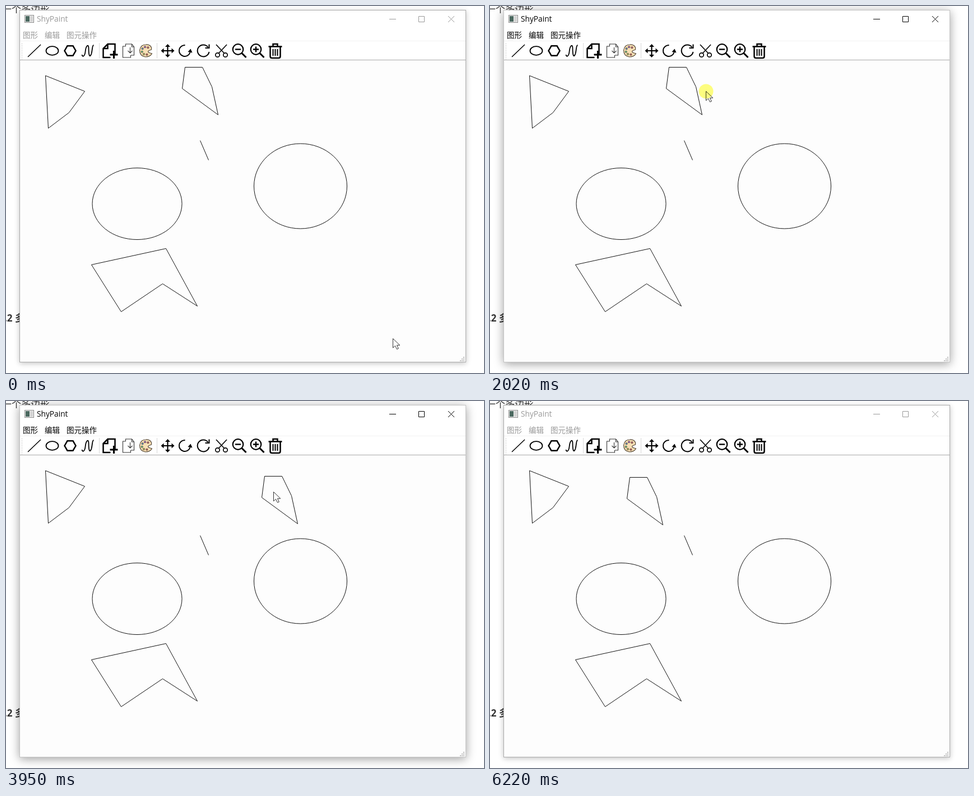
An HTML page with a canvas that plays this animation: 853 by 656 pixels, repeating every 6.43 s.

```html
<!DOCTYPE html>
<html lang="zh">
<head>
<meta charset="utf-8">
<title>Paint window</title>
<style>
html, body { margin: 0; width: 100%; height: 100%; overflow: hidden; background: #fff; }
canvas { display: block; }
</style>
</head>
<body>
<canvas id="stage" width="853" height="656"></canvas>
<script>
const g = document.getElementById('stage').getContext('2d');
const LOOP = 6430, STEP = 77;
const CJK = '"Noto Sans CJK SC", "Noto Sans CJK", sans-serif';

// Cursor moves: start, end, and where it arrives
const moves = [
  [70, 680, 299, 83],
  [760, 900, 296, 82],
  [1310, 1470, 357, 152],
  [1620, 1690, 349, 145],
  [1860, 2260, 420, 158],
  [2400, 2630, 406, 150],
  [2950, 3480, 477, 162],
  [4110, 4590, 292, 163],
  [4660, 4750, 265, 164],
  [5200, 5820, 798, 647]
];
const click = [830, 1080];
const drags = [[1690, 2400], [2870, 3560], [4030, 4900]];

const within = (v, [a, b]) => v >= a && v < b;
const smooth = p => p * p * (3 - 2 * p);

function cursorAt(t) {
  let x = 690, y = 594;
  for (const [a, b, tx, ty] of moves) {
    if (t < a) break;
    const gaps = Math.round((b - a) / STEP);
    const done = t >= b ? 1 : (Math.floor((t - a) / (b - a) * gaps) + 1) / (gaps + 1);
    x += (tx - x) * smooth(done);
    y += (ty - y) * smooth(done);
  }
  return [Math.round(x), Math.round(y)];
}

// A dragged shape jumps on release by the distance the cursor went
function dragOffset(t) {
  let dx = 0, dy = 0;
  for (const [a, b] of drags) {
    if (t < b) break;
    const [x0, y0] = cursorAt(a), [x1, y1] = cursorAt(b - 1);
    dx += x1 - x0;
    dy += y1 - y0;
  }
  return [dx, dy];
}

function stroke(d, width = 2, color = '#000') {
  g.lineWidth = width;
  g.strokeStyle = color;
  g.stroke(new Path2D(d));
}
function fill(d, color = '#000') {
  g.fillStyle = color;
  g.fill(new Path2D(d));
}
function ring(x, y, rx, ry, width, color = '#000') {
  g.beginPath();
  g.ellipse(x, y, rx, ry, 0, 0, 7);
  g.lineWidth = width;
  g.strokeStyle = color;
  g.stroke();
}
function disc(x, y, r, color) {
  g.beginPath();
  g.arc(x, y, r, 0, 7);
  g.fillStyle = color;
  g.fill();
}
function rect(x, y, w, h, color) {
  g.fillStyle = color;
  g.fillRect(x, y, w, h);
}
function text(s, x, y, font, color) {
  g.font = font;
  g.fillStyle = color;
  g.fillText(s, x, y);
}
function at(x, y, paint) {
  g.save();
  g.translate(x, y);
  paint();
  g.restore();
}

function drawPage() {
  rect(0, 0, 853, 656, '#fff');
  text('一个多边形', -7, 12, '17px ' + CJK, '#333');
  text('.2 多', -3, 564, 'bold 17px "Open Sans", ' + CJK, '#333');
}

function drawFrame(active) {
  g.save();
  g.shadowColor = active ? 'rgba(0,0,0,.38)' : 'rgba(0,0,0,.24)';
  g.shadowBlur = active ? 16 : 9;
  g.shadowOffsetY = active ? 3 : 2;
  rect(24, 7, 797, 630, '#fff');
  g.restore();
  rect(24, 7, 797, 630, active ? '#c4c4c4' : '#aaa');
  rect(25, 8, 795, 628, '#fdfdfd');
  rect(25, 8, 795, 88, '#fff');
}

function drawTitle(ink) {
  rect(33, 16, 17, 14, '#8a8a8a');
  rect(34, 17, 15, 12, '#eee');
  rect(35, 18, 7, 10, '#4a685f');
  rect(43, 18, 5, 10, '#d4d4d4');
  text('ShyPaint', 55, 28, '13.7px "Open Sans", "Noto Sans", sans-serif', ink);
  text('图形', 30, 57, '13.5px ' + CJK, ink);
  text('编辑', 69, 57, '13.5px ' + CJK, ink);
  text('图元操作', 108, 57, '13.5px ' + CJK, ink);
  rect(684, 23, 12, 1, ink);
  stroke('M736.5 18.5h10v10h-10z', 1, ink);
  stroke('M789 18l11 11m0-11l-11 11', 1, ink);
}

function drawBars() {
  rect(25, 62, 795, 1, '#f1f1f1');
  rect(25, 96, 795, 1, '#a8a8a8');
  for (let y = 67; y < 95; y += 3) rect(28, y, 1, 1, '#aaa');
  for (const x of [166, 269]) rect(x, 66, 1, 28, '#d8d8d8');
  for (let i = 0; i < 3; i++)
    for (let j = 0; j <= i; j++) rect(816 - j * 3, 627 + i * 3, 2, 2, '#bbb');
}

function palette() {
  const d = 'M0-11C7-12 11-7 10-2C8-1 4-1 4 2C5 4 9 4 11 5C9 9 5 11-1 11C-7 10-11 6-11-1C-10-7-6-11 0-11z';
  fill(d, '#f7dfb4');
  stroke(d, 1.1, '#4d4030');
  for (let i = 0; i < 6; i++) {
    const a = 1.3 + i * 0.8, x = 7 * Math.cos(a), y = 7 * Math.sin(a);
    disc(x, y, 2, '#4d4030');
    disc(x, y, 1.4, `hsl(${i * 70}, 35%, 55%)`);
  }
}

function fourArrows() {
  stroke('M-8 0H8M0-8V8', 2.2);
  for (let i = 0; i < 4; i++) {
    fill('M12 0L7-4.5V4.5z');
    g.rotate(Math.PI / 2);
  }
}

function scissors() {
  for (const side of [-1, 1]) {
    ring(side * 7, 7.5, 3.7, 3.7, 1.7);
    stroke(`M${side * 9.5}-11L${-side * 5} 4.5`, 1.7);
  }
}

function zoom(sign) {
  ring(-2.5, -2.5, 9.3, 9.3, 2.2);
  stroke('M4.5 4.5L12 12', 3);
  stroke(sign, 2.4);
}

// Each tool is drawn around its own centre
const tools = [
  () => stroke('M-11.5 11L11.5-11', 1.5),
  () => ring(0, 0, 11, 7.8, 1.8),
  () => stroke('M-10 0l5-8.7H5L10 0L5 8.7H-5z', 2.5),
  () => stroke('M-11 7C-10 12-6 10-5 2C-4-9 1-14 1-4C1 8 3 14 6 5C8-2 7-10 10-10', 1.8),
  () => {
    stroke('M9 6V-12H-4L-12-4V12H1M-4-12V-4H-12', 2.5);
    stroke('M0 7H14M7 0V14', 3.2);
  },
  () => {
    stroke('M-4-8V-12H7L11-7V8H5M7-12V-7H11', 1.1, '#333');
    stroke('M-4-8H-9V12H5V8M-4-8V-8M4-6V4M0 0L4 4L8 0', 1.1, '#333');
  },
  palette,
  fourArrows,
  () => {
    stroke('M-1-10A10 10 0 1 0 8 3', 2);
    fill('M9-3.5L12 3.5L4 2z');
  },
  () => {
    stroke('M8-6.5A10.5 10.5 0 1 0 10 2', 2);
    stroke('M10-11.5V-5H3', 2);
  },
  scissors,
  () => zoom('M-7.5-2.5H2.5'),
  () => zoom('M-7.5-2.5H2.5M-2.5-7.5V2.5'),
  () => {
    stroke('M-12-7.5H12M-4-7V-12H4V-7M-9-7V10Q-9 13-6 13H6Q9 13 9 10V-7', 2.5);
    stroke('M-4-3V9M0-3V9M4-3V9', 2);
  }
];

function drawTools() {
  tools.forEach((tool, i) => {
    const gap = 7 * ((i > 3) + (i > 6));
    at(50.5 + 32 * i + gap, 80, tool);
  });
}

function drawShapes(t) {
  const ink = '#111';
  at(0.5, 0.5, () => {
    stroke('M70 124L140 152L112 190L75 218z', 1, ink);
    stroke('M152 462L285 433L341 536L279 496L205 546z', 1, ink);
    stroke('M346 240L361 275', 1, ink);
    ring(233.5, 353, 80, 64, 1, ink);
    ring(525, 321.5, 83, 76, 1, ink);
    g.translate(...dragOffset(t));
    stroke('M319 109H350L367 144L378 194L314 147z', 1, ink);
  });
}

function drawCursor(x, y, down) {
  at(x + 0.5, y + 0.5, () => {
    const arrow = 'M0 0V16.5L4 12.8L7 19L9.8 17.8L7 11.8H12.3z';
    fill(arrow, '#fff');
    stroke(arrow, 1, '#333');
    if (down) {
      g.globalCompositeOperation = 'multiply';
      disc(0, 0, 13, '#ffff80');
    }
  });
}

function draw(t) {
  const [x, y] = cursorAt(t);
  const down = [click, ...drags].some(span => within(t, span));
  const active = within(t, [830, 6220]);
  drawPage();
  drawFrame(active);
  drawTitle(active ? '#000' : '#999');
  drawBars();
  if (within(x, [273, 305]) && within(y, [64, 96])) {
    rect(273, 64, 32, 32, down ? '#99d1ff' : '#cce8ff');
    rect(274, 65, 30, 30, down ? '#cce8ff' : '#e5f3ff');
  }
  drawTools();
  drawShapes(t);
  if (t < 5900) drawCursor(x, y, down);
}

const start = performance.now();
function tick(now) {
  draw(Math.max(0, now - start) % LOOP);
  requestAnimationFrame(tick);
}
draw(0);
requestAnimationFrame(tick);
</script>
</body>
</html>
```
